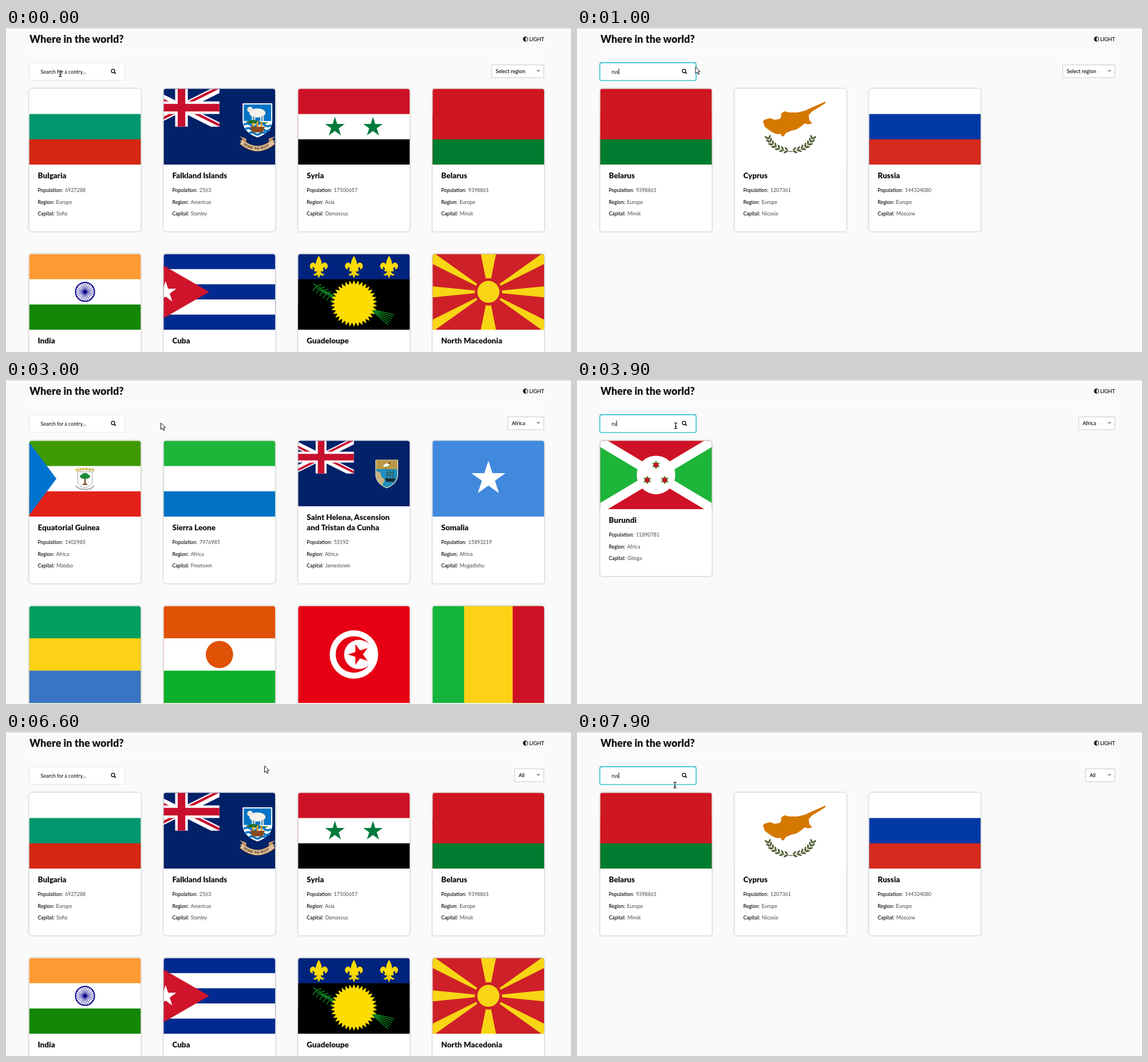
An HTML page for the animation above (8000 ms loop, 987 by 567 pixels).

```html
<!DOCTYPE html>
<html lang="en">
<head>
<meta charset="utf-8">
<title>Where in the world?</title>
<style>
html, body { margin: 0; width: 100%; height: 100%; overflow: hidden; background: #fafafa; }
#stage { display: block; font: 8.9px Lato, sans-serif; fill: #111517; }
.title { font-size: 18px; font-weight: 900; }
.name { font-size: 13.5px; font-weight: 900; }
.label { font-size: 8.7px; font-weight: 600; }
.value { fill: #484b4d; }
.bold { font-size: 9px; font-weight: 600; }
.input { font-weight: 500; }
.card { fill: #fff; filter: drop-shadow(0 0 1.6px rgba(0, 0, 0, .36)); }
</style>
</head>
<body>
<svg id="stage" width="987" height="567" viewBox="0 0 987 567">
  <defs><clipPath id="round"><rect width="195" height="400" rx="4.5"/></clipPath></defs>
  <rect width="987" height="1.4" fill="#e2e2e2"/>
  <text class="title" x="41" y="26">Where in the world?</text>
  <circle cx="907.6" cy="19.4" r="3.8" fill="none" stroke="#111517" stroke-width="1.1"/>
  <path d="M907.6 15.4a4 4 0 0 0 0 8z"/>
  <text class="bold" x="914" y="22.7">LIGHT</text>
  <rect x="41" y="44" width="899" height="2" fill="#fff"/>
  <g id="cards"></g>
  <g id="controls"></g>
  <g id="pointer" stroke-linejoin="round"></g>
</svg>
<script>
const LOOP = 8000;
const $ = id => document.getElementById(id);

// Drawing helpers; every flag is 133 units high with its origin in the centre
const box = (x, y, w, h, fill, more = '') => `<rect x="${x}" y="${y}" width="${w}" height="${h}" fill="${fill}" ${more}/>`;
const path = (d, fill, more = '') => `<path d="${d}" fill="${fill}" ${more}/>`;
const line = (d, stroke, width = 1, more = '') => path(d, 'none', `stroke="${stroke}" stroke-width="${width}" ${more}`);
const disc = (x, y, r, fill, more = '') => `<circle cx="${x}" cy="${y}" r="${r}" fill="${fill}" ${more}/>`;
const oval = (x, y, rx, ry, fill, turn = 0) =>
  `<ellipse rx="${rx}" ry="${ry}" fill="${fill}" transform="translate(${x} ${y}) rotate(${turn})"/>`;
const text = (cls, x, y, s) => `<text class="${cls}" x="${x}" y="${y}">${s}</text>`;
const repeat = (n, draw) => Array.from({ length: n }, (_, i) => draw(i)).join('');
const mirror = art => art + `<g transform="scale(-1 1)">${art}</g>`;

function star(x, y, r, fill, { n = 5, k = .382, turn = 0, more = '' } = {}) {
  const points = Array.from({ length: 2 * n }, (_, i) => {
    const a = i * Math.PI / n - Math.PI / 2 + turn, d = i % 2 ? r * k : r;
    return (x + d * Math.cos(a)).toFixed(2) + ',' + (y + d * Math.sin(a)).toFixed(2);
  });
  return `<polygon points="${points.join(' ')}" fill="${fill}" ${more}/>`;
}
const field = fill => box(-140, -67, 280, 134, fill);
// Each stripe reaches the bottom so that no seams show
const stripes = (...colors) => colors.map((c, i) =>
  box(-140, -66.5 + i * 133 / colors.length, 280, 134, c)).join('');

const ensign = arms => field('#012169') +
  `<svg x="-133" y="-66.5" width="133" height="66.5" viewBox="0 0 60 30">
    <clipPath id="pinwheel"><path d="M30 15h30v15zv15H0zH0V0zV0h30z"/></clipPath>` +
  line('M0 0L60 30M60 0L0 30', '#fff', 6) +
  line('M0 0L60 30M60 0L0 30', '#c8102e', 4, 'clip-path="url(#pinwheel)"') +
  line('M30 0V30M0 15H60', '#fff', 10) + line('M30 0V30M0 15H60', '#c8102e', 6) +
  `</svg><g transform="translate(66.5 0)">${arms}</g>`;

const sheepArms =
  path('M-26-41H26V-8Q24 10 0 19Q-24 10-26-8Z', '#fff') +
  path('M-24-39H24V-10H-24Z', '#0073c6') +
  oval(0, -24, 14, 8, '#f4f2ec') + disc(-13, -30, 5, '#e6e3da') +
  line('M-9-18V-9M-5-18V-9M6-18V-9M10-18V-9', '#e6e3da', 2.4) +
  path('M-20-8Q-10-14 0-10T20-8L14-5H-14Z', '#1d6b2c') +
  line('M-24-3q6-5 12 0t12 0 12 0 12 0M-22 5q6-5 11 0t11 0 11 0 11 0M-15 12q5-4 10 0t10 0 10 0', '#0073c6', 3.5) +
  path('M-13 0H13L9 10H-9Z', '#8a4a1c') + line('M-7 0V-7M0 0V-9M7 0V-7', '#d9a52b', 3) +
  path('M-31 17L-20 21-19 31-31 26-26 22Z', '#c79a6f') + path('M31 17L20 21 19 31 31 26 26 22Z', '#c79a6f') +
  line('M-28 27Q0 50 28 27', '#6b3d1e', 10) + line('M-28 27Q0 50 28 27', '#e3c39c', 8.4) +
  '<path id="arc" d="M-25 31.2Q0 50 27 29.8" fill="none"/>' +
  '<text font-size="5.6" font-weight="700" fill="#3b2313"><textPath href="#arc">DESIRE THE RIGHT</textPath></text>';

const shipArms =
  path('M-23-28H23V5Q20 22 0 30Q-20 22-23 5Z', '#f0e3b0') +
  path('M-21.5-27H21.5V-9H-21.5Z', '#b99a4a') +
  path('M-21.5-9H21.5V5Q19 21 0 28.5Q-19 21-21.5 5Z', '#1f8fc0') +
  path('M-21.5-5L-13-2-10 8-4 12-9 24Q-19 18-21.5 5Z', '#c9b183') +
  path('M-4 10H18L14 17H-1Z', '#1a2a30') + line('M1 10V-7M7 10V-9M13 10V-7M-1-2H15M-1 4H15', '#3f4a3a', 1.2) +
  oval(-1, -17, 6, 3, '#fff', -20) + disc(5, -21, 2, '#7a3b1e') + line('M-2-14V-9', '#333');

const treeArms =
  path('M-13-12H13V6Q12 12 0 16Q-12 12-13 6Z', '#fafafa', 'stroke="#aaa"') +
  line('M0-2V10M-4 10H4', '#7b4a22', 2.4) + oval(0, -4, 9, 4.5, '#1c8c3a') + oval(0, -7, 5, 3, '#1c8c3a') +
  line('M-16 12Q-12 19 0 19T16 12', '#b5b5b5', 2.5) +
  repeat(6, i => star(-14 + i * 5.6, -17 + Math.abs(i - 2.5) * .7, 3, '#f0c419', { more: 'stroke="#9a8420" stroke-width=".4"' }));

const lily = x => `<g transform="translate(${x} -43.5)">` +
  path('M0-20C4-12 8-7 3 5H-3C-8-7-4-12 0-20Z', '#fddc00') +
  mirror(path('M3 5C3-5 9-11 14-6C18-1 14 5 10 4C13-1 8-2 7 5Z', '#fddc00') +
    path('M0 8L3 7Q5 14 10 12 7 18 3 13L0 20Z', '#fddc00')) + box(-8, 4.5, 16, 3, '#fddc00') + '</g>';

const palms = line(repeat(9, i => `M-28 12L${-72 + i * 4} ${-15 + i * 2.6 + (i % 2) * 4}`) +
    repeat(6, i => `M${-66 + i * 6} ${-10 + i * 4}l-6 9M${-66 + i * 6} ${-10 + i * 4}l9-3`), '#0b7a1c', 1.5) +
  line(repeat(6, i => `M28 30L${71 - i * 2.2} ${40 + i * 3.6}`), '#0b7a1c', 1.5);

const island = 'M-48-9L-46-12-36-15-27-12-18-14-16-19-17-22-11-27-2-25 13-25 25-28 38-34 52-40 61-44 61-41 50-34 37-26 32-20 33-12 38-6 31-4 25-6 18 0 10 5 1 7-8 11-12 17-15 17-17 13-25 13-33 9-40 4-45 0Z';
const olive = line('M3 44Q-34 41-40 17', '#4e5b31', .8) + repeat(7, i => {
  const deg = 101 + i * 11, a = deg * Math.PI / 180;
  const leaf = (grow, tilt) =>
    oval((41 + grow) * Math.cos(a), 12 + (31 + grow) * Math.sin(a), 3.9, 1.5, '#4e5b31', deg + 90 + tilt);
  return leaf(2, -35) + leaf(-3.5, 35);
});

const sunRays = 'M0 0L-133-66.5H-93ZL133-66.5H93ZL-133 66.5H-93ZL133 66.5H93ZL-13.3-66.5H13.3ZL-13.3 66.5H13.3ZL-133-13.3V13.3ZL133-13.3V13.3Z';

// name, population, region, capital, width to height ratio, flag
const COUNTRIES = [
  ['Bulgaria', 6927288, 'Europe', 'Sofia', 5 / 3, stripes('#fff', '#00966e', '#d62612')],
  ['Falkland Islands', 2563, 'Americas', 'Stanley', 2, ensign(sheepArms)],
  ['Syria', 17500657, 'Asia', 'Damascus', 1.5, stripes('#ce1126', '#fff', '#000') +
    star(-33.3, .8, 18, '#007a3d') + star(33.3, .8, 18, '#007a3d')],
  ['Belarus', 9398861, 'Europe', 'Minsk', 2, stripes('#ce1720', '#ce1720', '#007c30')],
  ['India', 1380004385, 'Asia', 'New Delhi', 1.5, stripes('#ff9933', '#fff', '#138808') +
    disc(0, 0, 16.6, 'none', 'stroke="#000088" stroke-width="2"') + disc(0, 0, 3, '#000088') +
    repeat(24, i => line('M0 0V-16', '#000088', .8, `transform="rotate(${i * 15})"`))],
  ['Cuba', 11326616, 'Americas', 'Havana', 2, stripes('#002a8f', '#fff', '#002a8f', '#fff', '#002a8f') +
    path('M-133-66.5L-18 0-133 66.5Z', '#cf142b') + star(-94.3, .7, 19.8, '#fff')],
  ['Guadeloupe', 400132, 'Americas', 'Basse-Terre', 1.5, stripes('#00247d', '#000', '#000') +
    lily(-61.5) + lily(0) + lily(61.5) + palms + star(0, 20.5, 41, '#fddc00', { n: 34, k: .82 })],
  ['North Macedonia', 2077132, 'Europe', 'Skopje', 2, field('#ce2028') + path(sunRays, '#f8d616') +
    disc(0, 0, 24, '#ce2028') + disc(0, 0, 19.3, '#f8d616')],
  ['Equatorial Guinea', 1402985, 'Africa', 'Malabo', 1.5, stripes('#3e9a00', '#fff', '#e32118') +
    path('M-99.75-66.5L-50 0-99.75 66.5Z', '#0073ce') + treeArms],
  ['Sierra Leone', 7976985, 'Africa', 'Freetown', 1.5, stripes('#1eb53a', '#fff', '#0072c6')],
  ['Saint Helena, Ascension|and Tristan da Cunha', 53192, 'Africa', 'Jamestown', 2, ensign(shipArms)],
  ['Somalia', 15893219, 'Africa', 'Mogadishu', 1.5, field('#4189dd') + star(0, 0, 31.5, '#fff')],
  ['Gabon', 2225728, 'Africa', 'Libreville', 4 / 3, stripes('#009e60', '#fcd116', '#3a75c4')],
  ['Niger', 24206636, 'Africa', 'Niamey', 7 / 6, stripes('#e05206', '#fff', '#0db02b') + disc(0, 0, 18.7, '#e05206')],
  ['Tunisia', 11818618, 'Africa', 'Tunis', 1.5, field('#e70013') + disc(0, 0, 33.2, '#fff') +
    disc(0, 0, 25, '#e70013') + disc(6.6, 0, 20, '#fff') + star(6.6, 0, 15, '#e70013', { turn: -Math.PI / 2 })],
  ['Mali', 20250834, 'Africa', 'Bamako', 1.5, field('#14b53a') +
    box(-33.25, -67, 140, 134, '#fcd116') + box(33.25, -67, 67, 134, '#ce1126')],
  ['Cyprus', 1207361, 'Europe', 'Nicosia', 1.5, field('#fff') + path(island, '#d57800') + mirror(olive)],
  ['Burundi', 11890781, 'Africa', 'Gitega', 5 / 3, field('#ce1126') +
    path('M-111-66.5L111 66.5V-66.5L-111 66.5Z', '#1eb53a') +
    line('M-111-66.5L111 66.5M111-66.5L-111 66.5', '#fff', 18) + disc(0, 0, 37.5, '#fff') +
    [[0, -19.4], [-17, 10], [17, 10]].map(([x, y]) =>
      star(x, y, 7.6, '#ce1126', { n: 6, k: .577, more: 'stroke="#1eb53a"' })).join('')],
  ['Russia', 144104080, 'Europe', 'Moscow', 1.5, stripes('#fff', '#0039a6', '#d52b1e')],
].map(([name, population, region, capital, ratio, flag]) =>
  ({ lines: name.split('|'), population, region, capital, ratio, flag }));

const extra = c => 18 * (c.lines.length - 1);

function card(c, x, y, height) {
  const flagH = height - 117 - extra(c), w = 133 * c.ratio;
  const row = (label, shift, value, dy) =>
    text('label', 15, height + dy, label + ':') + text('value', 15 + shift, height + dy, value);
  return `<g transform="translate(${x} ${y})"><rect class="card" width="195" height="${height}" rx="4.5"/>
    <g clip-path="url(#round)"><svg width="195" height="${flagH}" viewBox="${-w / 2} -66.5 ${w} 133"
      preserveAspectRatio="xMidYMid slice">${c.flag}</svg></g>` +
    c.lines.map((s, i) => text('name', 15, flagH + 24 + 18 * i, s)).join('') +
    row('Population', 47.4, c.population, -68.8) + row('Region', 32, c.region, -48.2) +
    row('Capital', 32.4, c.capital, -27.6) + '</g>';
}

function drawCards(query, region) {
  const found = COUNTRIES.filter(c => c.lines.join(' ').toLowerCase().includes(query) &&
    (!region || region === 'All' || c.region === region));
  let html = '', y = 106.3;
  for (let r = 0; r < 8; r += 4) {
    const row = found.slice(r, r + 4);
    const height = Math.max(...row.map(c => 195 / c.ratio + 119.7 + extra(c)));
    html += row.map((c, i) => card(c, 40.5 + 234.9 * i, y, height)).join('');
    y += height + 39.4;
  }
  $('cards').innerHTML = html;
}

const REGIONS = ['All', 'Africa', 'Americas', 'Asia', 'Europe', 'Oceania'];

function drawControls({ query, region, focus, open }, caret, hover) {
  const left = { Africa: 876.5, All: 888.5 }[region] || 848.5, width = 939.5 - left;
  let html = focus
    ? box(39.9, 60.7, 168.2, 31.2, '#fff', 'rx="3" stroke="#17bccd" stroke-width="1.4"')
    : box(40.5, 61, 167, 30.5, '#fff', 'rx="3" stroke="#e6e6e6"');
  html += `<text id="query" class="input" x="60.5" y="79.7">${query || 'Search for a contry...'}</text>` +
    disc(187, 75.2, 3, 'none', 'stroke="#111517" stroke-width="1.4"') + line('M189.2 77.4L191.4 79.6', '#111517', 1.7, 'stroke-linecap="round"') +
    box(left, 64.5, width, 22.5, '#fff', 'stroke="#ccc"') +
    text('bold', left + 6.9, 79, region || 'Select region') + path('M926.5 73.5h7l-3.5 3.8z', '#999');
  if (open) {
    html += box(left, 87.5, width, 124, '#fff', 'stroke="#ccc"') + REGIONS.map((name, i) => {
      const y = 88 + i * 20.5;
      return (hover >= y && hover < y + 20.5 ? box(left + .5, y, width - 1, 20.5, '#e4e4e4') : '') +
        text('bold', left + 6.9, y + 13.5, name);
    }).join('');
  }
  $('controls').innerHTML = html;
  if (caret) {
    const x = 60.5 + (query && $('query').getComputedTextLength());
    $('controls').insertAdjacentHTML('beforeend', box(x, 71, 1, 10, '#111517'));
  }
}

// Each step changes only the properties it names
let last = { query: '', region: '', focus: false, open: false };
const STEPS = [
  [0, {}], [100, { focus: true }],
  [500, { query: 'r' }], [700, { query: 'ru' }], [900, { query: 'rus' }], [1300, { query: 'russ' }],
  [2100, { open: true }], [3000, { query: '', region: 'Africa', focus: false, open: false }],
  [3500, { focus: true }],
  [3800, { query: 'r' }], [3900, { query: 'ru' }], [4100, { query: 'rus' }], [4200, { query: 'russ' }],
  [5100, { focus: false }], [6100, { open: true }], [6400, { query: '', region: 'All', open: false }],
  [7100, { focus: true }], [7500, { query: 'r' }], [7800, { query: 'ru' }], [7900, { query: 'rus' }],
].map(([time, change]) => last = { ...last, ...change, time });

// time, x, y
const TRACK = [
  [0, 95, 80], [200, 95, 80], [1000, 207, 68], [1100, 207, 68], [1600, 560, 50], [2000, 896, 73],
  [2300, 896, 112], [2900, 896, 112], [3000, 270.5, 75], [3200, 225, 51], [3600, 172.5, 80], [4000, 172.5, 80],
  [4300, 180, 78], [4400, 180, 78], [4500, 463, 112], [4600, 463, 112], [4700, 640, 108], [4800, 942, 80],
  [4900, 893, 95], [5000, 893, 95], [5500, 891, 86], [5600, 891, 86], [5800, 904, 85], [6000, 904, 85],
  [6200, 904, 97], [6300, 904, 97], [6800, 150, 34], [6900, 150, 34], [7100, 113, 77], [7300, 113, 77],
  [7600, 160, 80], [7900, 171, 93], [LOOP, 171, 93],
];

function pointerAt(t) {
  const i = TRACK.findIndex(p => p[0] > t), [t0, x0, y0] = TRACK[i - 1], [t1, x1, y1] = TRACK[i];
  const k = (t - t0) / (t1 - t0);
  return [x0 + (x1 - x0) * k, y0 + (y1 - y0) * k];
}

const ARROW = path('M0 0V11.6L2.7 9.2 4.6 13.3 6.5 12.5 4.6 8.5 8 8.2Z', '#fff', 'stroke="#111" stroke-width="1"');
const BEAM_PATH = 'M-2.6-5Q0-5 0-3.6Q0-5 2.6-5M0-4V4M-2.6 5Q0 5 0 3.6Q0 5 2.6 5M-1.5 1.5H1.5';
const BEAM = line(BEAM_PATH, '#fff', 2.4) + line(BEAM_PATH, '#222', 1.3);

let cardsKey, controlsKey;
function frame(now) {
  const t = Math.floor(now % LOOP / 100) * 100;
  const state = STEPS.findLast(s => s.time <= t), [x, y] = pointerAt(t);
  const caret = state.focus && !state.open && (t - state.time) % 1060 < 530;

  const nextCards = state.query + '/' + state.region;
  if (nextCards !== cardsKey) drawCards(state.query, state.region);
  cardsKey = nextCards;

  const nextControls = [state.time, caret, state.open && y].join();
  if (nextControls !== controlsKey) drawControls(state, caret, y);
  controlsKey = nextControls;

  const overInput = x > 40 && x < 206 && y > 60 && y < 94;
  $('pointer').innerHTML = overInput ? BEAM : ARROW;
  $('pointer').setAttribute('transform', `translate(${x} ${y})`);
  requestAnimationFrame(frame);
}
requestAnimationFrame(frame);
</script>
</body>
</html>
```
